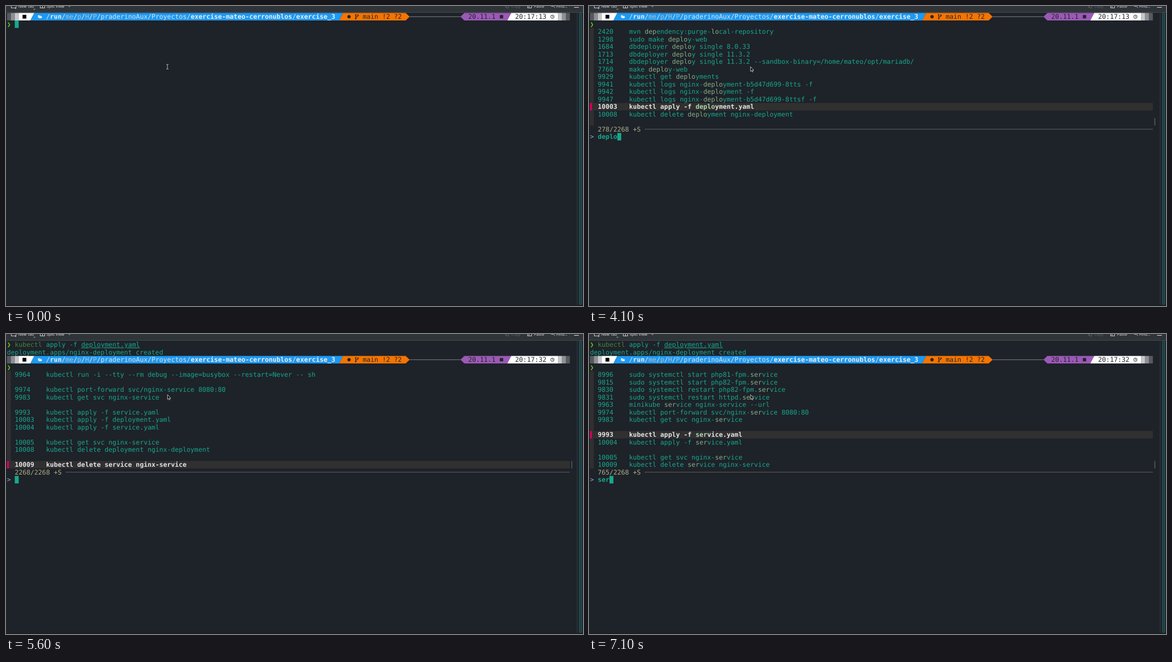
Recreate the animation shown at these times as an HTML page. Size 1037 px wide and 540 px high, loop 8000 ms.

```html
<!DOCTYPE html>
<html lang="en">
<head>
<meta charset="utf-8">
<title>Terminal history search</title>
<style>
  html, body { margin: 0; width: 100%; height: 100%; overflow: hidden; background: #1e2229; }
  svg { display: block; }
  text { white-space: pre; text-rendering: geometricPrecision; }
  .mono { font: 11.67px "DejaVu Sans Mono", monospace; }
  .bold { font-weight: bold; }
  .under { text-decoration: underline; }
  .ui { font: 7.1px "Noto Sans", sans-serif; }
</style>
</head>
<body>
<svg width="1037" height="540" viewBox="0 0 1037 540">
  <rect width="1037" height="540" fill="#1e2229"/>
  <g id="screen"></g>
  <g id="chrome"></g>
  <g id="pointer"></g>
</svg>
<script>
const LOOP = 8000, CW = 7.026, RH = 13.5, LEFT = 1.7, TOP = 12.5, COLS = 144, LIST_ROWS = 13;
const C = {
  bg: '#1e2229', fg: '#17a88b', green: '#5fd700', cmd: '#44853a', white: '#ffffff',
  blue: '#1d99f3', orange: '#f67400', purple: '#9b59b6', dark: '#232627',
  hl: '#87af87', bar: '#303030', barText: '#e4e4e4', barHl: '#afd7af',
  info: '#afaf87', ask: '#87afd7', mark: '#d7005f', line: '#5f5f5f'
};

// Shell history; a trailing newline leaves an empty row below the entry.
const HISTORY = {
  1298: 'sudo make deploy-web',
  1684: 'dbdeployer deploy single 8.0.33',
  1713: 'dbdeployer deploy single 11.3.2',
  1714: 'dbdeployer deploy single 11.3.2 --sandbox-binary=/home/mateo/opt/mariadb/',
  2420: 'mvn dependency:purge-local-repository',
  7760: 'make deploy-web',
  8996: 'sudo systemctl start php81-fpm.service',
  9815: 'sudo systemctl start php82-fpm.service',
  9830: 'sudo systemctl restart php82-fpm.service',
  9831: 'sudo systemctl restart httpd.service',
  9929: 'kubectl get deployments',
  9935: "kubectl get pods -l app=nginx -o jsonpath='{.items[*].metadata.name}' | \\\n" +
        "xargs -I {} bash -c \"kubectl logs {} --follow --tail=100 | while read line; do echo '[{}] $line'; done\"\n",
  9941: 'kubectl logs nginx-deployment-b5d47d699-8tts -f',
  9942: 'kubectl logs nginx-deployment -f',
  9947: 'kubectl logs nginx-deployment-b5d47d699-8ttsf -f',
  9963: 'minikube service nginx-service --url',
  9964: 'kubectl run -i --tty --rm debug --image=busybox --restart=Never -- sh\n',
  9974: 'kubectl port-forward svc/nginx-service 8080:80',
  9983: 'kubectl get svc nginx-service\n',
  9993: 'kubectl apply -f service.yaml',
  10003: 'kubectl apply -f deployment.yaml',
  10004: 'kubectl apply -f service.yaml\n',
  10005: 'kubectl get svc nginx-service',
  10008: 'kubectl delete deployment nginx-deployment\n',
  10009: 'kubectl delete service nginx-service'
};

// Result lists, best match first (drawn from the bottom up).
const ALL = [10009, 10008, 10005, 10004, 10003, 9993, 9983, 9974, 9964];
const D = [10009, 10008, 10003, 9964, 9947, 9942, 9941, 9935];
const DE = [10009, 10008, 10003, 9964, 9947, 9942, 9941, 9929, 7760, 1714, 1713];
const DEP = [10008, 10003, 9947, 9942, 9941, 9929, 7760, 1714, 1713, 1684, 1298, 2420];
const S = [10009, 10005, 10004, 9993, 9983, 9974, 9964, 9963, 9831, 9830];
const SER = [10009, 10005, 10004, 9993, 9983, 9974, 9963, 9831, 9830, 9815, 8996];

const X = c => LEFT + c * CW;
const Y = r => TOP + r * RH;
const box = (x, y, w, h, fill) => `<rect x="${x}" y="${y}" width="${w}" height="${h}" fill="${fill}"/>`;
const cells = (r, c, n, fill) => box(X(c), Y(r), n * CW, RH, fill);
const path = (d, fill, stroke = 'none', w = 1) =>
  `<path d="${d}" fill="${fill}" stroke="${stroke}" stroke-width="${w}"/>`;
const put = (r, c, str, fill, cls = '') =>
  `<text class="mono ${cls}" x="${X(c)}" y="${Y(r) + 10.8}" fill="${fill}">${str}</text>`;
const cursor = (r, c) => cells(r, c, 1, C.fg);
const arrow = r => put(r, 0, '❯', C.green);

// Polygon across one row; each side is [column at top, at middle, at bottom].
function band(r, a, b, fill) {
  const y = [Y(r), Y(r) + RH / 2, Y(r) + RH];
  const pts = [...a.map((c, i) => [X(c), y[i]]), ...b.map((c, i) => [X(c), y[i]]).reverse()];
  return path('M' + pts.map(p => p.join()).join('L') + 'Z', fill);
}

function promptBar(r, time) {
  const y = Y(r), m = y + RH / 2;
  const shades = ['#565a5f', '#8e9194', '#c6c8ca'];
  let s = '';
  shades.forEach((f, i) => s += cells(r, i, 1, f) + cells(r, COLS - 1 - i, 1, f));
  s += band(r, [3, 3, 3], [7, 6.5, 6], C.white);
  s += band(r, [7, 6.5, 6], [86, 85.5, 85], C.blue);
  s += band(r, [86, 85.5, 85], [102, 103, 102], C.orange);
  s += path(`M${X(103)},${m}H${X(116)}`, 'none', '#808488');
  s += band(r, [117, 116, 117], [129, 128.5, 128], C.purple);
  s += band(r, [129, 128.5, 128], [141, 141, 141], C.white);
  s += box(29.7, m - 3.4, 6.8, 6.8, '#000');
  s += path(`M57.6,${m + 2.6}v-5h2.2l.8,.9h3v1.1h-4.2zM58.3,${m + 2.6}l1.4,-2.6h5.4l-1.5,2.6z`, C.white);
  s += `<circle cx="616.5" cy="${m}" r="3" fill="${C.dark}"/>`;
  s += path(`M628.6,${m - 3}v6.2M632.6,${m - 2.6}v1.2q0,1.6 -4,2`, 'none', C.dark, 1.1);
  for (const [cx, dy] of [[628.6, -3.2], [628.6, 3.4], [632.6, -2.8]])
    s += `<circle cx="${cx}" cy="${m + dy}" r="1.3" fill="${C.dark}"/>`;
  s += box(887.5, m - 3, 6, 6, C.dark);
  s += `<circle cx="982" cy="${m}" r="3.1" fill="none" stroke="${C.dark}" stroke-width=".9"/>`;
  s += path(`M982,${m - 2}v2.2h1.6`, 'none', C.dark, .8);
  let c = 10;
  const parts = [
    ['/', '#e4e4e4'], ['run', '#eeeeee', 'bold'], ['/', '#e4e4e4'],
    ['me', '#bcbcbc'], ['/', '#e4e4e4'], ['p', '#bcbcbc'], ['/', '#e4e4e4'],
    ['H', '#bcbcbc'], ['/', '#e4e4e4'], ['P', '#bcbcbc'],
    ['/praderinoAux/Proyectos/', '#e4e4e4'],
    ['exercise-mateo-cerronublos', '#eeeeee', 'bold'], ['/', '#e4e4e4'], ['exercise_3', '#eeeeee', 'bold']
  ];
  for (const [str, fill, cls] of parts) {
    s += put(r, c, str, fill, cls);
    c += str.length;
  }
  return s + put(r, 91, 'main !2 ?2', C.dark) + put(r, 118, '20.11.1', C.dark) + put(r, 130, time, C.dark);
}

// Longest query prefix at a word start, then the rest further on.
function matches(str, query, from = 0) {
  for (let n = query.length; n > 0; n--) {
    const hit = new RegExp('(?<![a-z0-9])' + query.slice(0, n)).exec(str.slice(from));
    if (!hit) continue;
    const at = from + hit.index;
    return [[at, n], ...matches(str, query.slice(n), at + n)];
  }
  return [];
}

function entryLine(r, str, query, on) {
  const cls = on ? 'bold' : '', fill = on ? C.barText : C.fg;
  let s = '', at = 0;
  const piece = (end, f) => {
    if (end > at) s += put(r, 10 + at, str.slice(at, end), f, cls);
    at = end;
  };
  for (const [start, n] of matches(str, query)) {
    piece(start, fill);
    piece(start + n, on ? C.barHl : C.hl);
  }
  piece(str.length, fill);
  return s;
}

function finder(base, query, count, list, picked) {
  const info = `${count}/2268 +S`, infoRow = base + LIST_ROWS, sep = 3 + info.length;
  let s = '', r = infoRow;
  if (list.length) {
    s += box(X(0), Y(base), CW, LIST_ROWS * RH, C.bar);
    s += path(`M${X(144.5)},${Y(infoRow - 1)}v${RH}`, 'none', '#777');
  }
  for (const id of list) {
    const lines = HISTORY[id].split('\n'), on = id === picked;
    r -= lines.length;
    if (on) s += box(X(0), Y(r), COLS * CW, RH * lines.length, C.bar) +
                 box(X(0), Y(r), CW / 2, RH * lines.length, C.mark);
    s += put(r, 2, id, on ? C.barText : C.fg, on ? 'bold' : '');
    lines.forEach((str, i) => s += entryLine(r + i, str, query, on));
  }
  s += put(infoRow, 2, info, C.info);
  s += path(`M${X(sep)},${Y(infoRow) + RH / 2}H${X(COLS)}`, 'none', C.line);
  s += put(infoRow + 1, 0, '>', C.ask) + put(infoRow + 1, 2, query, C.fg, 'bold');
  return s + cursor(infoRow + 1, 2 + query.length);
}

const command = r => arrow(r) + put(r, 2, 'kubectl', C.cmd) + put(r, 10, 'apply -f', C.fg) +
  put(r, 19, 'deployment.yaml', C.fg, 'under');
const output = () => command(0) + put(1, 0, 'deployment.apps/nginx-deployment created', C.fg);
const first = () => promptBar(0, '20:17:13') + arrow(1);
const second = () => output() + promptBar(2, '20:17:32') + arrow(3);
const findA = (...args) => first() + finder(2, ...args);
const findB = (...args) => second() + finder(4, ...args);

// [start ms, mouse pointer shape, screen]
const STEPS = [
  [0, 'beam', () => first() + cursor(1, 2)],
  [300, 'arrow', () => findA('', 0, [])],
  [400, 'arrow', () => findA('', 2268, ALL, 10009)],
  [700, 'arrow', () => findA('d', 1544, D, 10009)],
  [800, 'arrow', () => findA('de', 902, DE, 10009)],
  [900, 'arrow', () => findA('dep', 341, DEP, 10008)],
  [1000, 'arrow', () => findA('depl', 283, DEP, 10008)],
  [1200, 'arrow', () => findA('deplo', 278, DEP, 10008)],
  [4100, 'arrow', () => findA('deplo', 278, DEP, 10003)],
  [4400, 'beam', () => promptBar(0, '20:17:13') + command(1) + cursor(1, 34)],
  [4500, 'beam', () => command(0) + cursor(0, 34)],
  [4700, 'beam', () => output() + cursor(2, 0)],
  [4800, 'beam', () => second() + cursor(3, 2)],
  [5600, 'arrow', () => findB('', 2268, ALL, 10009)],
  [5800, 'arrow', () => findB('s', 2019, S, 10009)],
  [5900, 'arrow', () => findB('se', 1127, SER, 10009)],
  [6000, 'arrow', () => findB('ser', 765, SER, 10009)],
  [6800, 'arrow', () => findB('ser', 765, SER, 10005)],
  [6900, 'arrow', () => findB('ser', 765, SER, 10004)],
  [7100, 'arrow', () => findB('ser', 765, SER, 9993)]
];

const beam = 'M288,105h1.6l.5,.5l.5,-.5h1.6M290.1,105.5v7.5M288,113.5h1.6l.5,-.5l.5,.5h1.6';
const POINTERS = {
  beam: path(beam, 'none', '#000', 2) + path(beam, 'none', '#ddd', 1),
  arrow: path('M290.3,109.3v8.4l1.9,-1.7l1.3,2.7l1.4,-.7l-1.2,-2.5h2.3z', '#000', '#eee', .8)
};

function chrome() {
  const light = '#dfe1e2', dim = '#5d6266';
  const label = (x, str, fill = light) => `<text class="ui" x="${x}" y="2.7" fill="${fill}">${str}</text>`;
  return box(0, 0, 1037, 12, '#2f3439') + box(0, 11, 1037, 1, '#454a4f') +
    label(22, 'New Tab') + label(73, 'Split View') + label(908, 'Copy', dim) +
    label(949, 'Paste') + label(989, 'Find...') +
    path('M9.5,0v3.5h5M18.5,0v1.5M15,3.5h4M17,1.5v4', 'none', light, .9) +
    path('M61.5,0v3.5h8v-3.5M65.5,0v3.5', 'none', light, .9) +
    path('M49.5,5l1.5,1.5l1.5,-1.5M112.5,0l1.5,1.5l1.5,-1.5', 'none', light, .8) +
    path('M897.5,0v2h2M899.5,0v3.5h4v-3.5', 'none', dim, .9) +
    path('M937.5,0v3.5h2M940,0v3.5h4.5v-3.5', 'none', light, .9) +
    path('M979.5,0q2,1.5 4,0l3,3.2', 'none', light, .9) +
    path('M1021,2.5h8.5', 'none', light, 1) +
    box(1026, 12, 1, 527, '#33383e') +
    `<rect x="1030.5" y="12.5" width="4" height="525" rx="1.5" fill="#1c3e43" stroke="#24595a"/>` +
    box(0, 538.5, 1037, 1.5, '#191d22');
}

const el = id => document.getElementById(id);
el('chrome').innerHTML = chrome();

let shown = null;
function draw(t) {
  const step = STEPS.findLast(s => s[0] <= t);
  if (step === shown) return;
  shown = step;
  el('screen').innerHTML = step[2]();
  el('pointer').innerHTML = POINTERS[step[1]];
}

const start = performance.now();
function tick() {
  draw((performance.now() - start) % LOOP);
  requestAnimationFrame(tick);
}
tick();
</script>
</body>
</html>
```
